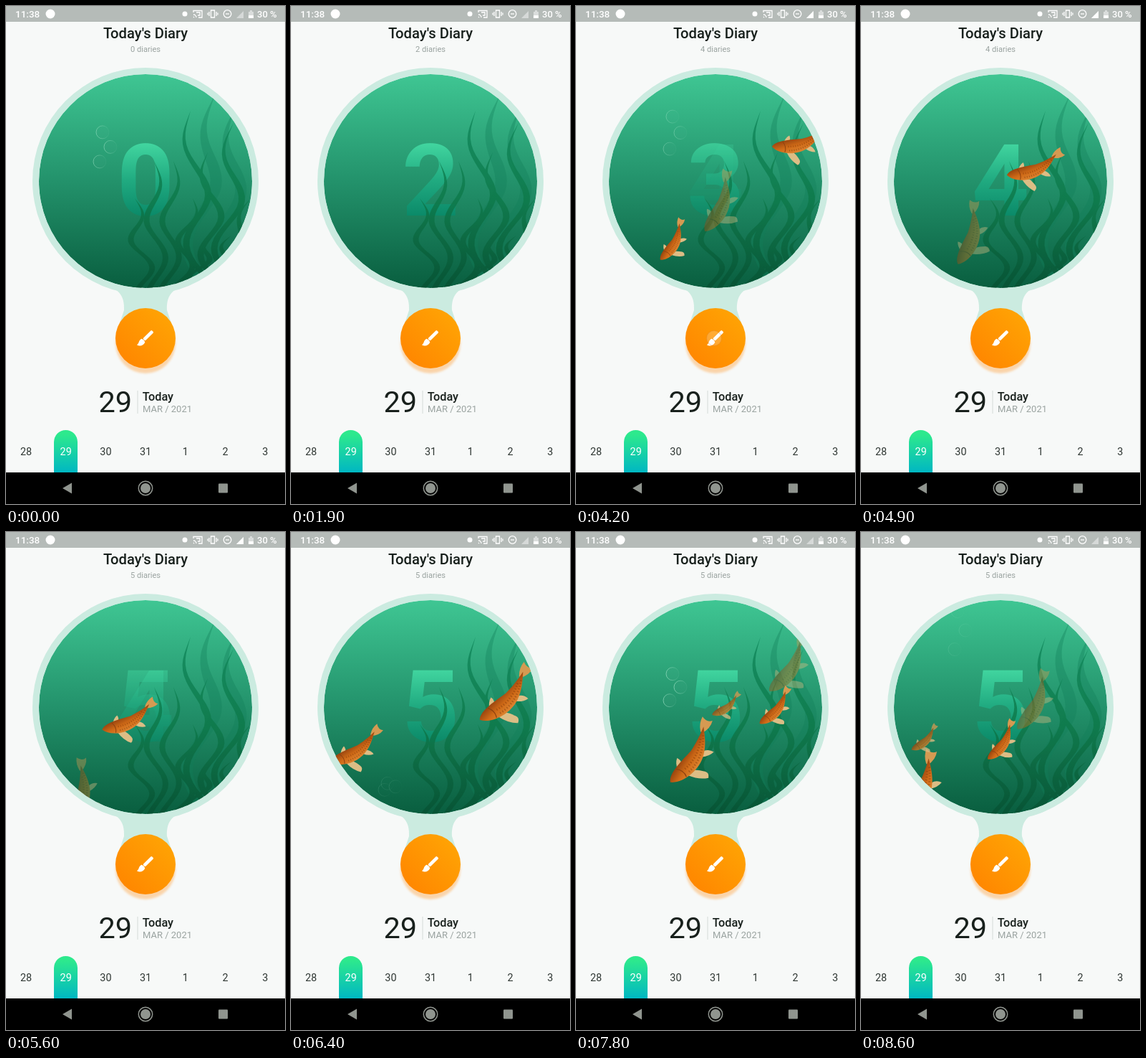
Recreate the animation shown at these times as an HTML page. Size 390 by 694 pixels, loop 8700 ms.

```html
<!DOCTYPE html>
<html lang="en">
<head>
<meta charset="utf-8">
<title>Today's Diary</title>
<style>
  html, body { margin: 0; width: 100%; height: 100%; overflow: hidden; background: #f7f9f8; }
  svg { display: block; width: 100vw; height: 100vh; font-family: Roboto, sans-serif; }
  .mid { text-anchor: middle; }
  .medium { font-weight: 500; }
  .soft { fill: #9aa3a0; }
  .digit { font-size: 139px; font-weight: 700; text-anchor: middle; fill: url(#digitFill); }
</style>
</head>
<body>
<svg viewBox="0 0 390 694">
  <defs>
    <linearGradient id="water" x2="0" y2="1">
      <stop stop-color="#3fc693"/><stop offset=".5" stop-color="#23926b"/><stop offset="1" stop-color="#095e3f"/>
    </linearGradient>
    <linearGradient id="digitFill" gradientUnits="userSpaceOnUse" x1="0" y1="192" x2="0" y2="292">
      <stop stop-color="#41d59f"/><stop offset=".5" stop-color="#21ab81"/><stop offset="1" stop-color="#0b8a69"/>
    </linearGradient>
    <linearGradient id="weed" gradientUnits="userSpaceOnUse" x1="0" y1="145" x2="0" y2="393">
      <stop stop-color="#128a5e"/><stop offset=".5" stop-color="#0f7a4b"/><stop offset="1" stop-color="#085234"/>
    </linearGradient>
    <linearGradient id="button" x1="0" y1="1" x2="1" y2="0">
      <stop offset=".1" stop-color="#ff8600"/><stop offset=".9" stop-color="#ffa404"/>
    </linearGradient>
    <linearGradient id="pill" x2="0" y2="1">
      <stop offset=".1" stop-color="#2de98d"/><stop offset="1" stop-color="#00b7c2"/>
    </linearGradient>
    <linearGradient id="scales" x2="0" y2="1">
      <stop stop-color="#dd8430"/><stop offset=".5" stop-color="#cf6a17"/><stop offset="1" stop-color="#99450f"/>
    </linearGradient>
    <linearGradient id="rim">
      <stop stop-color="#b5efd5"/><stop offset="1" stop-color="#b5efd5" stop-opacity=".1"/>
    </linearGradient>
    <filter id="blur" x="-20%" y="-20%" width="140%" height="140%"><feGaussianBlur stdDeviation="1.5"/></filter>
    <clipPath id="bowl"><circle cx="195" cy="244" r="149"/></clipPath>

    <!-- about 100 units long, swimming towards +x -->
    <g id="fish">
      <g fill="#dcbd85">
        <path d="M27 -8Q24 -24 14 -34Q7 -31 9 -25Q12 -16 15 -12Z"/>
        <path d="M-6 -10Q-12 -18 -21 -20Q-21 -12 -14 -7Z"/>
        <path d="M28 9Q23 17 15 19Q14 13 18 9Z"/>
        <path d="M-34 9Q-46 2 -57 6Q-50 11 -54 21Q-43 20 -35 12Z" fill="#d59a52"/>
      </g>
      <path d="M49 8C41 -8 12 -18 -10 -10C-24 -5 -34 4 -43 12C-28 9 -16 8 -4 8C14 11 40 17 49 8Z" fill="url(#scales)"/>
      <path d="M22 -6Q-6 -13 -33 6M22 1Q-4 -6 -28 7" fill="none" stroke="#7d3609" stroke-opacity=".45" stroke-width="3" stroke-dasharray="1.5 2.5"/>
      <path d="M30 -7Q24 1 29 12" fill="none" stroke="#8f4210" stroke-width="1.3"/>
    </g>
  </defs>

  <rect width="390" height="694" fill="#f7f9f8"/>

  <!-- status bar -->
  <rect width="390" height="22" fill="#b5bbb8"/>
  <g fill="#fff">
    <text class="medium" x="13" y="16" font-size="13.5">11:38</text>
    <circle cx="62" cy="11" r="6.500"/>
    <circle cx="250" cy="11" r="3.500"/>
    <path d="M322 17L332 7V17Z" opacity=".45"/>
    <path id="signal" d="M322 17L332 7V17Z"/>
    <path d="M339 8h2V6h3v2h2v9h-7Z" opacity=".5"/>
    <path d="M339 13h7v4h-7Z"/>
    <text class="medium" x="351" y="16" font-size="13">30 %</text>
  </g>
  <g fill="none" stroke="#fff" stroke-width="1.3">
    <path d="M262 9V6.500H274V16H269M262 12a4 4 0 0 1 4 4M262 15l1 1M266 9h5v4h-3"/>
    <path d="M286.500 6h5v10h-5ZM284 8v6M294 8v6M282 9.500v3M296 9.500v3"/>
    <circle cx="309.500" cy="11" r="5.300"/><path d="M307 11h5"/>
  </g>

  <text class="mid medium" x="195" y="45" font-size="20.200" fill="#18201c">Today's Diary</text>
  <text id="label" class="mid soft" x="195" y="64" font-size="11.100"></text>

  <!-- bowl -->
  <circle cx="195" cy="244" r="158" fill="#cbebe0"/>
  <path d="M138 389C160 394 166 407 165 424L158 445H232L225 424C224 407 230 394 252 389Z" fill="#cbebe0"/>
  <g clip-path="url(#bowl)">
    <circle cx="195" cy="244" r="149" fill="url(#water)"/>
    <text id="oldDigit" class="digit" x="195" y="292"></text>
    <text id="newDigit" class="digit" x="195" y="292"></text>
    <g id="backWeeds" fill="#137f59" opacity=".35"></g>
    <g id="weeds" fill="url(#weed)" opacity=".85"></g>
    <g id="bubbles" fill="#fff" fill-opacity=".04" stroke="url(#rim)"></g>
    <g id="school"></g>
  </g>

  <!-- add button -->
  <circle cx="195" cy="470" r="42" fill="#ff9a2e" opacity=".38" filter="url(#blur)"/>
  <circle cx="195" cy="463" r="42" fill="url(#button)"/>
  <g transform="translate(195 463) rotate(-45)" fill="#fff">
    <rect x="-3" y="-2.300" width="17" height="4.600" rx="1.300"/>
    <path d="M-4.500 -3.500C-9 -5 -11 -1 -15 -2C-14 3 -9 5 -4.500 3.500Q-2.500 0 -4.500 -3.500Z"/>
  </g>
  <circle id="touch" cx="193" cy="463" r="10.500" fill="#fff" fill-opacity=".2" stroke="#d9822b" stroke-opacity=".4"/>

  <!-- date -->
  <text x="129.500" y="566" font-size="41.500" fill="#18201c">29</text>
  <path d="M184 536V568" stroke="#d5dad7"/>
  <text class="medium" x="190.700" y="550" font-size="16.300" fill="#18201c">Today</text>
  <text class="soft" x="191" y="566" font-size="13">MAR / 2021</text>
  <path d="M67 650V607.500a16.500 16.500 0 0 1 33 0V650Z" fill="url(#pill)"/>
  <g id="days" class="mid" font-size="14.400"></g>

  <!-- navigation bar -->
  <rect y="650" width="390" height="44"/>
  <g fill="#90958f">
    <path d="M79 672L92 664.500V679.500Z"/>
    <circle cx="195" cy="672" r="7"/>
    <circle cx="195" cy="672" r="9.700" fill="none" stroke="#90958f" stroke-width="1.500"/>
    <rect x="297" y="665.500" width="13" height="13" rx="1"/>
  </g>
</svg>

<script>
const LOOP = 8700, STEP = 100;
const $ = id => document.getElementById(id);
const clamp = v => Math.max(0, Math.min(1, v));

function add(parent, tag, attributes) {
  const node = document.createElementNS('http://www.w3.org/2000/svg', tag);
  for (const name in attributes) node.setAttribute(name, attributes[name]);
  return parent.appendChild(node);
}

for (let i = 0; i < 7; i++) {
  const day = add($('days'), 'text', { x: 28 + i * 55.7, y: 626, fill: i === 1 ? '#fff' : '#2f3733' });
  day.textContent = (27 + i) % 31 + 1;
}

// A blade waves sideways from its tip down to its root and widens on the way.
function addWeed(parent, tipX, tipY, rootX, swing, width) {
  const left = [], right = [], bottom = 396;
  for (let s = 0; s <= 1; s += 1 / 32) {
    const wave = swing * Math.sin(s * 10.5) * Math.min(1, .5 + s);
    const x = tipX + (rootX - tipX) * s - wave;
    const y = tipY + (bottom - tipY) * s;
    const half = width / 2 * Math.min(1, s * 3);
    left.push([x - half, y]);
    right.unshift([x + half, y]);
  }
  add(parent, 'polygon', { points: [...left, ...right].join(' ') });
}

addWeed($('backWeeds'), 292, 124, 262, 16, 16);
addWeed($('backWeeds'), 320, 142, 305, 16, 16);
addWeed($('weeds'), 258, 146, 274, 18, 9);
addWeed($('weeds'), 318, 163, 306, 18, 9);
addWeed($('weeds'), 282, 204, 290, 16, 9);
for (let i = 0; i < 7; i++) {
  const height = 60 * Math.cos((i - 1.5) * Math.PI / 3);
  addWeed($('weeds'), 180 + 27 * i, 268 - height, 195 + 16 * i, i < 4 ? -13 : 10, 8);
}

// Each fish crosses (x, y) at a given time and comes back every period.
const FISH_PERIOD = 5000, TURN = -8;
const fishes = [
  { time: 3600, x: 245, y: 240, speed: 93, course: 138, heading: 118, size: 93, opacity: .4 },
  { time: 3100, x: 250, y: 265, speed: 118, course: 150, heading: 129, size: 66 },
  { time: 5600, x: 173, y: 264, speed: 113, course: 153, heading: 154, size: 86 },
  { time: 7100, x: 234, y: 273, speed: 114, course: 150, heading: 129, size: 104 },
  { time: 7900, x: 196, y: 250, speed: 162, course: 159, heading: 143, size: 50, opacity: .75 }
];
for (const fish of fishes) fish.node = add($('school'), 'use', { href: '#fish', opacity: fish.opacity || 1 });

function drawFish(fish, time) {
  const age = time - fish.time + FISH_PERIOD / 2;
  const t = (age % FISH_PERIOD - FISH_PERIOD / 2) / 1000;
  const course = fish.course * Math.PI / 180;
  const x = fish.x + fish.speed * t * Math.cos(course);
  const y = fish.y + fish.speed * t * Math.sin(course);
  fish.node.style.display = age < 0 ? 'none' : '';
  fish.node.setAttribute('transform',
    `translate(${x} ${y}) rotate(${fish.heading + TURN * t}) scale(${fish.size / 106})`);
}

const BUBBLE_PERIOD = 4000, BUBBLE_START = 3100;
const bubbles = [0, 11, -4].map(offset => add($('bubbles'), 'circle', { cx: 135 + offset, r: 9 }));

function drawBubble(node, i, time) {
  const phase = (time - BUBBLE_START + 5000) % BUBBLE_PERIOD / 1000 - 1;
  const fade = clamp((phase + .8) / .5) * clamp((1.75 - phase) / 1.1);
  node.setAttribute('cy', 274 + 11.5 * i - (109 - 10 * i) * phase);
  node.setAttribute('opacity', .6 * fade);
}

const taps = [500, 1300, 2700, 4100, 5400], FADE = 400;

function drawCounter(time) {
  const count = taps.filter(tap => tap <= time).length;
  const mix = count ? clamp((time - taps[count - 1]) / FADE) : 1;
  $('label').textContent = count === 1 ? '1 diary' : count + ' diaries';
  $('oldDigit').textContent = Math.max(0, count - 1);
  $('newDigit').textContent = count;
  $('oldDigit').setAttribute('opacity', 1 - mix);
  $('newDigit').setAttribute('opacity', mix);
  const touching = taps.some(tap => Math.abs(time - tap) <= 100);
  $('touch').style.display = touching ? '' : 'none';
}

function draw(now) {
  const time = Math.floor(now % LOOP / STEP) * STEP;
  fishes.forEach(fish => drawFish(fish, time));
  bubbles.forEach((node, i) => drawBubble(node, i, time));
  drawCounter(time);
  $('signal').style.display = time >= 2800 && time < 6400 ? '' : 'none';
}

const start = performance.now();
function tick() {
  draw(performance.now() - start);
  requestAnimationFrame(tick);
}
tick();
</script>
</body>
</html>
```
